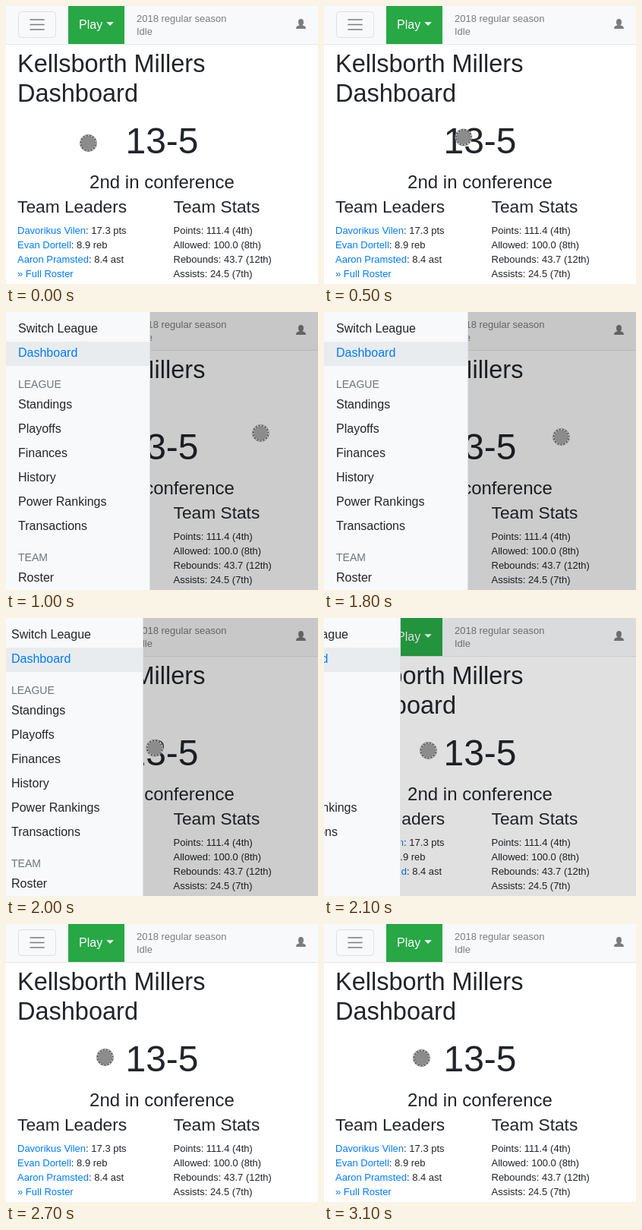
Animation, 411 px wide and 366 px high, one loop 3200 ms. Source, as an HTML page:

```html
<!DOCTYPE html>
<html lang="en">
<head>
<meta charset="utf-8">
<title>Team dashboard with sliding menu</title>
<style>
html, body { margin: 0; width: 100%; height: 100%; overflow: hidden; background: #fff; }
body { position: relative; font: 13px/19px "Liberation Sans", Arial, sans-serif; color: #212529; }
p, svg, div { position: absolute; margin: 0; white-space: nowrap; }
svg { left: 0; top: 0; }
.h1 { font-size: 32.5px; line-height: 39px; }
.h3 { font-size: 22.75px; line-height: 27px; }
.record { left: 15px; width: 381px; text-align: center; }
.play { font-size: 16px; line-height: 24px; color: #fff; }
.season { line-height: 17px; color: #7c7c7d; }
.link { color: #007bff; }
#shade { width: 411px; height: 366px; }
#drawer { left: -190px; width: 189px; height: 366px; background: #f8f9fa; border-right: 1px solid #dee0e2; font-size: 16px; line-height: 32px; }
#drawer p { left: 16px; }
#drawer .active { left: 0; top: 39px; width: 189px; height: 32px; background: #e9ecef; }
#drawer .group { font-size: 14px; line-height: 20px; color: #6c757d; }
</style>
</head>
<body>
<svg width="411" height="51">
  <rect width="411" height="50" fill="#f8f9fa"/>
  <rect y="50" width="411" height="1" fill="#e7e7e7"/>
  <rect x="16.5" y="7.5" width="49" height="34" rx="4" fill="none" stroke="#dfe0e1"/>
  <path d="M32 18h18M32 24.5h18M32 31h18" stroke="#7c7c7d" stroke-width="1.6" stroke-linecap="round"/>
  <rect x="82" width="74" height="50" fill="#28a745"/>
  <path d="M132.3 21.300h9.600l-4.800 4.800z" fill="#fff"/>
  <g fill="#7c7c7d">
    <ellipse cx="388.5" cy="21.2" rx="3.5" ry="4.3"/>
    <path d="M382 30q0-2.800 1.600-3.500l3.400-1.600v-2h3v2l3.400 1.600q1.600.700 1.600 3.500z"/>
  </g>
</svg>
<p class="play" style="left:96px;top:13px">Play</p>
<p class="season" style="left:172px;top:8px">2018 regular season<br>Idle</p>
<p class="h1" style="left:15px;top:57px">Kellsborth Millers<br>Dashboard</p>
<p class="record" style="top:151px;font-size:48px;line-height:54px">13-5</p>
<p class="record" style="top:218px;font-size:24px;line-height:28px">2nd in conference</p>
<p class="h3" style="left:15px;top:251px">Team Leaders</p>
<p class="h3" style="left:220.5px;top:251px">Team Stats</p>
<p style="left:15px;top:286px">
  <span class="link">Davorikus Vilen</span>: 17.3 pts<br>
  <span class="link">Evan Dortell</span>: 8.9 reb<br>
  <span class="link">Aaron Pramsted</span>: 8.4 ast<br>
  <span class="link">» Full Roster</span>
</p>
<p style="left:220.5px;top:286px">
  Points: 111.4 (4th)<br>
  Allowed: 100.0 (8th)<br>
  Rebounds: 43.7 (12th)<br>
  Assists: 24.5 (7th)
</p>

<div id="shade"></div>

<div id="drawer">
  <div class="active"></div>
  <p style="top:6px">Switch League<br><span class="link">Dashboard</span></p>
  <p class="group" style="top:85px">LEAGUE</p>
  <p style="top:106px">Standings<br>Playoffs<br>Finances<br>History<br>Power Rankings<br>Transactions</p>
  <p class="group" style="top:313px">TEAM</p>
  <p style="top:334px">Roster</p>
</div>

<svg width="411" height="366">
  <g id="touch" fill="none">
    <circle r="11.4" fill="#8c8c8c"/>
    <circle r="10" stroke="#484848" stroke-width="1.2"/>
    <circle r="10" stroke="#e4e4e4" stroke-width="1.2" stroke-dasharray="2 2.189"/>
  </g>
</svg>
<script>
const LOOP = 3200, STEP = 100, WIDTH = 190;
const [shade, drawer, touch] = ["shade", "drawer", "touch"].map(id => document.getElementById(id));

// Finger path: time, x, y
const path = [
  [400, 108.5, 180.5], [700, 334.5, 157.5], [800, 335.5, 159.5], [1700, 335.5, 159.5],
  [1800, 312.5, 164.5], [2100, 137.5, 174.5], [2200, 136.5, 174.5], [2600, 136.5, 174.5],
  [2700, 130.5, 175.5], [2800, 130.5, 175.5], [2900, 129.5, 175.5], [3000, 129.5, 175.5],
  [3100, 128.5, 176.5]
];

const part = (t, a, b) => Math.min(1, Math.max(0, (t - a) / (b - a)));
const smooth = f => f * f * (3 - 2 * f);
const easeOut = f => 1 - (1 - f) ** 3;

function finger(t) {
  const i = path.findIndex(p => p[0] >= t);
  if (i <= 0) return path[i < 0 ? path.length - 1 : 0].slice(1);
  const [a, b] = [path[i - 1], path[i]], f = part(t, a[0], b[0]);
  return [1, 2].map(k => a[k] + (b[k] - a[k]) * f);
}

function draw(t) {
  const open = easeOut(part(t, 600, 859)) - smooth(part(t, 1963, 2250));
  const dim = smooth(part(t, 600, 1000)) - smooth(part(t, 1983, 2253));
  drawer.style.left = Math.round(WIDTH * (open - 1)) + "px";
  shade.style.background = `rgba(0, 0, 0, ${(0.2 * dim).toFixed(3)})`;
  touch.setAttribute("transform", `translate(${finger(t)})`);
}

const start = performance.now();
function tick() {
  const t = (performance.now() - start) % LOOP;
  draw(Math.floor(t / STEP) * STEP);
  requestAnimationFrame(tick);
}
tick();
</script>
</body>
</html>
```
